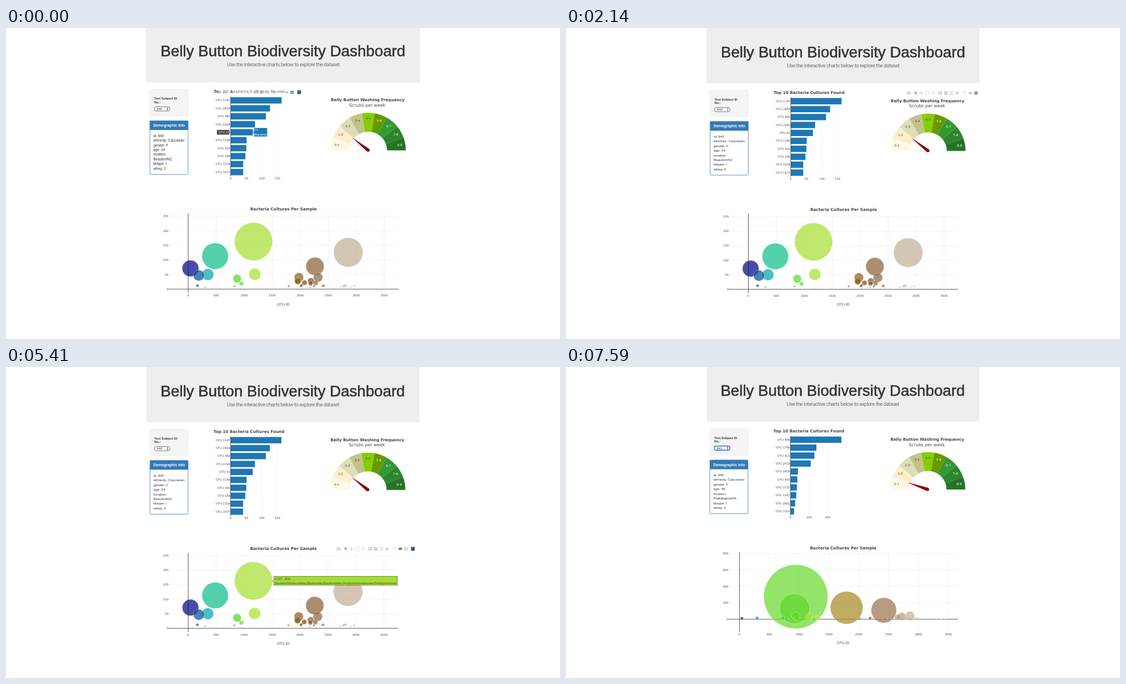
An HTML page for the animation above (8 s loop, 998 px wide and 561 px high).

```html
<!DOCTYPE html>
<html lang="en">
<head>
<meta charset="utf-8">
<title>Belly Button Biodiversity Dashboard</title>
<style>
html, body { margin: 0; width: 100%; height: 100%; overflow: hidden; background: #fff; }
svg { display: block; width: 998px; height: 561px; }
text { font-family: "DejaVu Sans", Verdana, sans-serif; fill: #444; white-space: pre; }
.page { font-family: "Liberation Sans", Arial, sans-serif; fill: #333; }
.lead { font-family: Roboto, "Liberation Sans", sans-serif; font-weight: 300; letter-spacing: -.32px; fill: #333; }
.hover { font-family: "Liberation Sans", Arial, sans-serif; }
.menu { font-family: Inter, sans-serif; font-weight: 500; fill: #fff; }
.bold { font-weight: bold; }
.white { fill: #fff; }
</style>
</head>
<body>
<svg id="stage" viewBox="0 0 998 561"></svg>
<script>
const LOOP = 8000;

const subjects = {
  940: {
    info: ['id: 940', 'ethnicity: Caucasian', 'gender: F', 'age: 24', 'location:', 'Beaufort/NC', 'bbtype: I', 'wfreq: 2'],
    needle: [624.6, 200],
    bars: [[1167, 163], [2859, 126], [482, 113], [2264, 78], [41, 71], [1189, 51], [352, 50], [189, 47], [2318, 40], [1977, 40]],
    barScale: .561, barTicks: [0, 50, 100, 150],
    small: [[874, 36], [1959, 29], [1956, 26], [2191, 28], [950, 19], [2077, 22], [2275, 21], [2186, 19], [165, 12], [830, 10],
      [307, 7], [1795, 10], [2011, 10], [2024, 13], [2178, 6], [2247, 10], [2401, 10], [2419, 12], [2722, 7], [2774, 10],
      [2810, 12], [2908, 7], [2964, 10], [1200, 4], [2035, 4], [1270, 2]],
    x0: 328.5, kx: .1007, y0: 471.3, ky: .525, yTicks: [0, 50, 100, 150, 200, 250]
  },
  945: {
    info: ['id: 945', 'ethnicity: Caucasian', 'gender: F', 'age: 48', 'location:', 'Philidelphia/PA', 'bbtype: I', 'wfreq: 1'],
    needle: [618, 209.8],
    bars: [[944, 275], [1795, 140], [922, 129], [2419, 109], [2859, 40], [943, 37], [2722, 34], [1167, 31], [2651, 25], [1314, 19]],
    barScale: .333, barTicks: [0, 100, 200],
    small: [[296, 14], [41, 12], [727, 15], [2189, 13], [2011, 9], [2782, 12], [2964, 11], [482, 5], [610, 4], [820, 5],
      [910, 6], [1210, 6], [2320, 4], [2390, 5], [2480, 5], [2540, 6], [3120, 4], [3290, 3], [3380, 4], [3450, 4]],
    x0: 313, kx: .1075, y0: 455.5, ky: .1478, yTicks: [0, 200, 400, 600, 800]
  }
};

// start time, page offset and scale, header edges, what is pointed at
const steps = [
  { at: 0, move: [-1, -1.9, 1.002, 1.0035], head: [252, 746], bar: 4 },
  { at: 1050, bar: 6 },
  { at: 2140, tools: 'gauge' },
  { at: 3230, move: [0, -.5, 1, 1.001], tools: 'gauge', slice: true },
  { at: 4320, tools: 'bubble' },
  { at: 5410, move: [-.3, 0, 1, 1], tools: 'bubble', bubble: true },
  { at: 6500, move: [-2.7, 0, 1, 1], head: [256, 741.7], menu: true, focus: true },
  { at: 7590, move: [-.5, -1, 1, 1.001], head: [253.5, 744.5], id: 945, focus: true }
];

const text = (x, y, str, size, cls = '', anchor = 'start', extra = '') =>
  `<text x="${x}" y="${y + size * .36}" font-size="${size}" class="${cls}" text-anchor="${anchor}" ${extra}>${str}</text>`;
const rect = (x, y, w, h, fill, extra = '') =>
  `<rect x="${x}" y="${y}" width="${w}" height="${h}" fill="${fill}" ${extra}/>`;
const path = (d, fill, stroke = 'none', width = 1) =>
  `<path d="${d}" fill="${fill}" stroke="${stroke}" stroke-width="${width}"/>`;
const line = (x1, y1, x2, y2, color = '#eee', width = .7) => path(`M${x1} ${y1}L${x2} ${y2}`, 'none', color, width);

function header([left, right]) {
  return rect(left, -5, right - left, 104.5, '#eee', 'rx="2.6"');
}

function intro() {
  return text(499, 43, 'Belly Button Biodiversity Dashboard', 27.7, 'page', 'middle', 'stroke="#333" stroke-width=".55"') +
    text(499.5, 67.7, 'Use the interactive charts below to explore the dataset', 9.3, 'lead', 'middle');
}

function sidebar(id, focus) {
  const ring = focus ? 'stroke="#4a7fd0" stroke-width="1.7"' : 'stroke="#555" stroke-width=".8"';
  return rect(259.7, 112.6, 68.6, 47.2, '#f5f5f5', 'stroke="#e3e3e3" stroke-width=".6" rx="1.6"') +
    text(267.5, 128.6, 'Test Subject ID', 5.8, 'page bold') + text(267.5, 135, 'No.:', 5.8, 'page bold') +
    rect(268, 143.5, 27.3, 7.5, '#fff', `rx="2.2" ${ring}`) +
    text(271.8, 147.3, id, 6, 'page') +
    path('M290 146.6l1.4-2 1.4 2zM290 148l1.4 2 1.4-2z', '#333') +
    rect(259.7, 168.7, 68.6, 96.6, '#fff', 'stroke="#337ab7" stroke-width=".8" rx="1.6"') +
    rect(259.5, 168.5, 69, 16.8, '#337ab7', 'rx="1.4"') +
    text(266, 177, 'Demographic Info', 6.7, 'page bold white') +
    subjects[id].info.map((row, i) => text(266, 195.6 + i * 8.43, row, 6.25, 'page')).join('');
}

function barChart({ bars, barScale, barTicks }, hover) {
  const x0 = 405, rowY = i => 132 + i * 14.32;
  let out = text(438, 116.3, 'Top 10 Bacteria Cultures Found', 7.25, 'bold', 'middle');
  for (const v of barTicks) {
    const x = x0 + v * barScale;
    if (v) out += line(x, 125, x, 268.5);
    out += text(x, 272, v, 5.15, '', 'middle');
  }
  bars.forEach(([id, v], i) => {
    out += rect(x0, rowY(i) - 5.7, v * barScale, 11.4, '#1f77b4') + text(404, rowY(i), 'OTU ' + id, 5.15, '', 'end');
  });
  out += line(x0, 125, x0, 268.5, '#444', .9);
  if (hover === undefined) return out;

  const [id, v] = bars[hover], y = rowY(hover), x = x0 + v * barScale;
  const left = 402.5 - (id > 99 ? 25.5 : 22.5);
  return out +
    path(`M${left} ${y - 4.4}H402.5V${y - 2}L405 ${y}L402.5 ${y + 2}V${y + 4.4}H${left}Z`, '#444', '#fff', .4) +
    text(403, y, 'OTU ' + id, 5.3, 'white', 'end') +
    path(`M${x} ${y}l2.3-2.5v-5.4h23.6v15.8h-23.6v-5.4z`, '#1f77b4', '#fff', .5) +
    text(x + 3.5, y - 3.6, v, 5.6, 'hover white') + text(x + 3.5, y + 3.9, 'Bacteria', 5.6, 'hover white') +
    rect(384, 111, 151, 12, '#fff', 'opacity=".55"') + toolbar(528, 117.3, 11);
}

function gauge(needle, hover) {
  const cx = 652.4, cy = 221.8, outer = 67.4, inner = 33.6;
  const colors = ['#fff8e6', '#ffeecc', '#ddddbb', '#c3c388', '#88cc00', '#669900', '#339933', '#2d862d', '#267326'];
  const at = (r, deg) => {
    const a = deg * Math.PI / 180;
    return [cx - r * Math.cos(a), cy - r * Math.sin(a)];
  };
  let out = text(651.3, 131, 'Belly Button Washing Frequency', 7.25, 'bold', 'middle') +
    text(650.5, 140.6, 'Scrubs per week', 7.85, '', 'middle');
  colors.forEach((color, i) => {
    const a = i * 20, b = a + 20, [x, y] = at(57.2, a + 10);
    out += path(`M${at(outer, a)}A${outer} ${outer} 0 0 1 ${at(outer, b)}L${at(inner, b)}A${inner} ${inner} 0 0 0 ${at(inner, a)}Z`, color) +
      text(x, y, `${i}-${i + 1}`, 5.6, i > 4 ? 'white' : '', 'middle');
  });
  const [dx, dy] = [needle[0] - cx, needle[1] - cy], k = 2.9 / Math.hypot(dx, dy);
  out += path(`M${needle}L${cx - dy * k} ${cy + dx * k}L${cx + dy * k} ${cy - dx * k}Z`, '#850000', '#850000', .5) +
    `<circle cx="${cx + .2}" cy="${cy}" r="2.3" fill="#850000"/>`;
  if (hover) out += path('M643.5 164.5l-2.6-2.2v-2.2h-11.6v8.8h11.6v-2.2z', '#88cc00', '#444', .6) +
    text(635.1, 164.5, '4-5', 5.6, 'hover', 'middle');
  return out;
}

// earth colour ramp over the range of ids
function earth(id) {
  const t = (id - 41) / 3400;
  const ramp = [[0, 0, 0, 130], [.1, 0, 180, 180], [.2, 40, 210, 40], [.4, 230, 230, 50], [.6, 120, 70, 20], [1.01, 255, 255, 255]];
  const i = Math.max(1, ramp.findIndex(stop => stop[0] > t));
  const a = ramp[i - 1], b = ramp[i], k = (t - a[0]) / (b[0] - a[0]);
  return `rgb(${[1, 2, 3].map(c => Math.round(a[c] + (b[c] - a[c]) * k))})`;
}

function bubbleChart({ bars, small, x0, kx, y0, ky, yTicks }, hover) {
  let out = text(500, 327, 'Bacteria Cultures Per Sample', 7.25, 'bold', 'middle') +
    text(499.8, 498.6, 'OTU ID', 6.4, '', 'middle');
  for (let v = 0; v <= 3500; v += 500) {
    const x = x0 + v * kx;
    if (v) out += line(x, 335, x, 478);
    out += text(x, 482.7, v, 5.15, '', 'middle');
  }
  for (const v of yTicks) {
    const y = y0 - v * ky;
    if (v) out += line(293.5, y, 706.5, y);
    out += text(293, y, v, 5.15, '', 'end');
  }
  out += line(293, y0, 706.5, y0, '#444', .9) + line(x0, 335, x0, 478, '#444', .9);
  for (const [id, v] of bars.concat(small))
    out += `<circle cx="${x0 + id * kx}" cy="${y0 - v * ky}" r="${v * .21}" fill="${earth(id)}" stroke="#fff" stroke-width=".5" opacity=".7"/>`;
  if (hover) out += path('M480.6 385.6l2.2-2.6v-5.4h222.6v16h-222.6v-5.4z', '#a3dd30', '#444', .6) +
    text(484.5, 382, '(1167, 163)', 5.62, 'hover') +
    text(484.5, 389.7, 'Bacteria;Bacteroidetes;Bacteroidia;Bacteroidales;Porphyromonadaceae;Porphyromonas', 5.62, 'hover');
  return out;
}

// icon: offset from the last button, filled shape, stroked shape
const icons = [
  [-134, 'M-3.4-1.8H-1.8L-1-2.8H1L1.8-1.8H3.4V2.8H-3.4ZM0-1A1.5 1.5 0 1 0 .01-1Z', ''],
  [-121, '', 'M-.5-2.5A2 2 0 1 0-.49-2.5ZM1 1L3 3M-1.5-.5H.5M-.5-1.5V.5'],
  [-111, 'M0-3.5L1-2.2H-1ZM0 3.5L1 2.2H-1ZM-3.5 0L-2.2-1V1ZM3.5 0L2.2-1V1Z', 'M-2.5 0H2.5M0-2.5V2.5'],
  [-100.5, '', 'M-3-1.5V-3H-1.3M-.6-3H.6M1.3-3H3V-1.5M3-.6V.6M3 1.5V3H1.3M.6 3H-.6M-1.3 3H-3V1.5M-3 .6V-.6'],
  [-90, '', 'M-3-.5C-3-3.5 3.3-3.3 3-.5C3 1.6-1.5 2-2 .8M-2 .8C-2 2.5-1 2-1 3.2'],
  [-77, 'M-3-3H3V3H-3ZM-.5-2V-.5H-2V.5H-.5V2H.5V.5H2V-.5H.5V-2Z', ''],
  [-67, 'M-3-3H3V3H-3ZM-2-.5V.5H2V-.5Z', ''],
  [-57, '', 'M-2.8-2.8L2.8 2.8M2.8-2.8L-2.8 2.8M-3-1.4V-3H-1.4M3-1.4V-3H1.4M-3 1.4V3H-1.4M3 1.4V3H1.4'],
  [-46.5, 'M0-3L3.2 0H2.3V2.8H.7V.8H-.7V2.8H-2.3V0H-3.2Z', ''],
  [-34, 'M1.2-3H2.6V-1.6H1.2Z', 'M-3-2.2H1M2-1V3'],
  [-23, 'M-3.4 0L-1.9-1.9H3.4V1.9H-1.9Z', ''],
  [-12.8, 'M-3.3-1.4L-2.5-2.6H3.3V-.4H-2.5ZM-3.3 1.4L-2.5.4H3.3V2.6H-2.5Z', '']
];

function toolbar(x, y, active, logo = true) {
  const buttons = icons.map(([dx, fill, stroke], i) =>
    `<g transform="translate(${x + dx} ${y})" opacity="${i === 1 || i === active ? .7 : .3}" fill-rule="evenodd">` +
    path(fill, '#444') + path(stroke, 'none', '#444', .8) + '</g>').join('');
  return buttons + (logo ? rect(x - 3.4, y - 3.4, 6.8, 6.8, '#3f5784') : '');
}

function menu() {
  const ids = [940, 941];
  for (let id = 943; id <= 975; id++) if (![951, 957, 965].includes(id)) ids.push(id);
  ids.push(978, 1233);
  return rect(257, 140.2, 34.6, 419, '#000', 'rx="4.5" opacity=".14"') +
    rect(257.3, 139.3, 34, 418.7, '#666', 'rx="4" stroke="#505050" stroke-width=".5"') +
    rect(258, 169, 33, 16, '#4a6178', 'opacity=".45"') +
    rect(261, 190, 27, 11.6, '#3f8ef5', 'rx="1"') +
    ids.map((id, i) => text(269.6, 148.5 + i * 11.79, id, 5.9, 'menu')).join('') +
    path('M263.2 148.8l1.5 1.8 2.5-4.2', 'none', '#fff', 1) +
    path('M272.2 551.2l2.1 1.9 2.1-1.9', 'none', '#fff', .9);
}

function draw(step) {
  const { move = [0, 0, 1, 1], head = [253, 745], id = 940 } = step;
  const data = subjects[id], [tx, ty, sx, sy] = move;
  let body = intro() + sidebar(id, step.focus) + barChart(data, step.bar) +
    gauge(data.needle, step.slice) + bubbleChart(data, step.bubble);
  if (step.tools === 'gauge') body += toolbar(751.2, 117.3, 11, false);
  if (step.tools === 'bubble') body += toolbar(733.3, 328, 10);
  return `<g transform="translate(0 ${ty}) scale(1 ${sy})">${header(head)}</g>` +
    `<g transform="translate(${tx} ${ty}) scale(${sx} ${sy})">${body}</g>` + (step.menu ? menu() : '');
}

const stage = document.getElementById('stage');
const scenes = steps.map(draw);
const start = performance.now();
let shown = -1;

function tick() {
  const time = (performance.now() - start) % LOOP;
  const now = steps.filter(step => step.at <= time).length - 1;
  if (now !== shown) stage.innerHTML = scenes[shown = now];
  requestAnimationFrame(tick);
}
tick();
</script>
</body>
</html>
```
